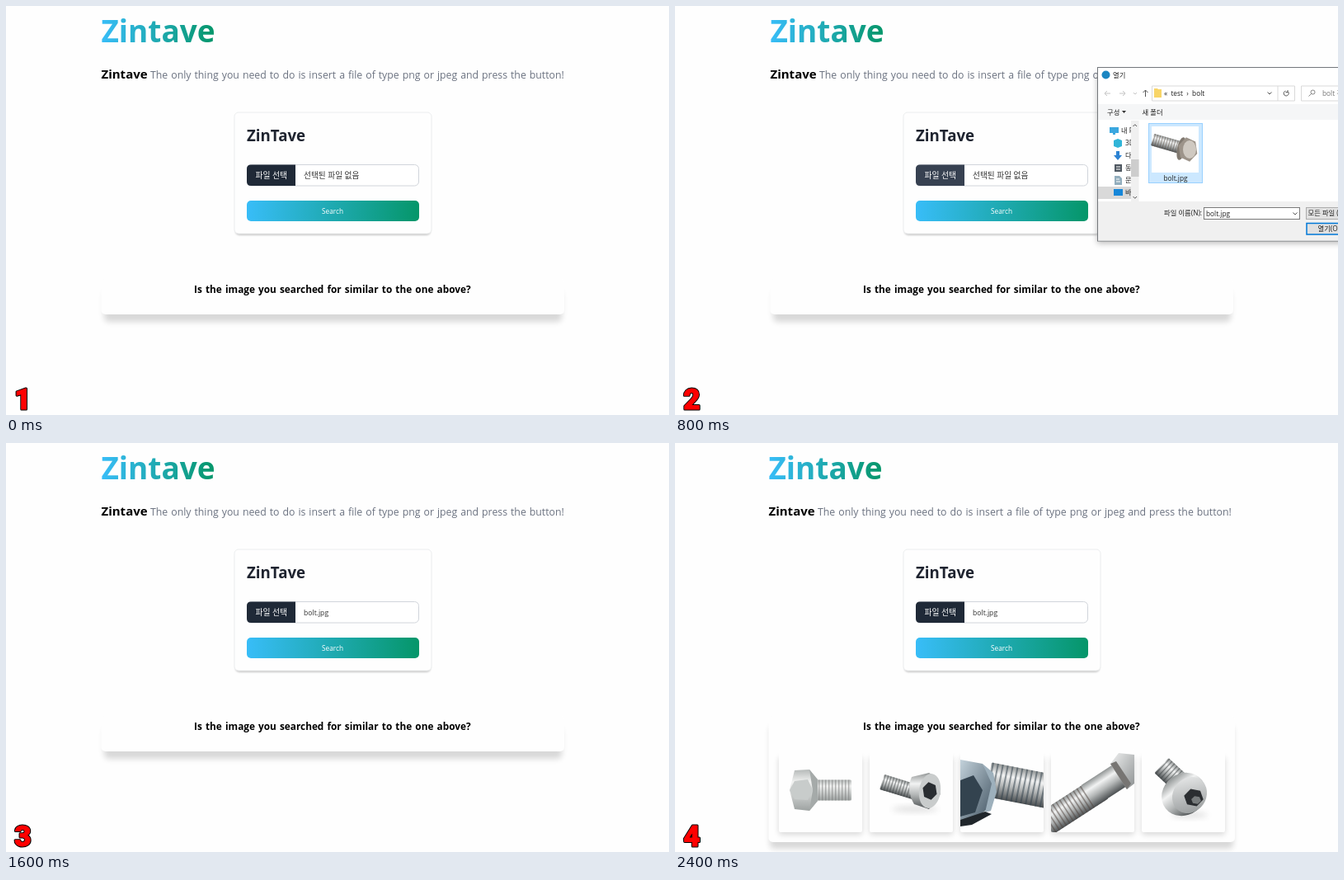
Animation, 804 px wide and 496 px high, one loop 3200 ms. Source, as an HTML page:

```html
<!DOCTYPE html>
<html lang="ko">
<head>
<meta charset="utf-8">
<style>
html, body { margin: 0; width: 100%; height: 100%; overflow: hidden; background: #fefefe; }
svg { display: block; }
text { font-family: "Open Sans", "Noto Sans CJK KR", "Noto Sans CJK", sans-serif; white-space: pre; }
.bold { font-weight: 700; }
.mid { text-anchor: middle; }
.ui { font-size: 8.3px; fill: #222; }
.icon { fill: none; stroke: #555; stroke-width: 1; }
.pale { stroke: #c4c4c4; }
.step { font: 900 35px Roboto, sans-serif; font-stretch: 75%; text-anchor: middle; stroke-linejoin: round; }
</style>
</head>
<body>
<svg width="804" height="496" viewBox="0 0 804 496">
  <defs>
    <linearGradient id="brand"><stop stop-color="#38bdf8"/><stop offset="1" stop-color="#059669"/></linearGradient>
    <linearGradient id="metal" x2="0" y2="1">
      <stop stop-color="#909494"/><stop offset=".3" stop-color="#f2f3f3"/>
      <stop offset=".6" stop-color="#b4b7b7"/><stop offset="1" stop-color="#4c5052"/>
    </linearGradient>
    <linearGradient id="pearl" x2="0" y2="1">
      <stop stop-color="#b5b9b8"/><stop offset=".3" stop-color="#f1f2f1"/><stop offset="1" stop-color="#9da2a1"/>
    </linearGradient>
    <linearGradient id="face" x2="1" y2="1"><stop stop-color="#f0f1f1"/><stop offset="1" stop-color="#8d9192"/></linearGradient>
    <linearGradient id="blue" x2="1" y2="1"><stop stop-color="#c3d2db"/><stop offset="1" stop-color="#415361"/></linearGradient>
    <filter id="soft" x="-10%" y="-40%" width="120%" height="180%"><feGaussianBlur stdDeviation="3.5"/></filter>
    <filter id="thin" x="-10%" y="-10%" width="120%" height="120%"><feGaussianBlur stdDeviation="1.3"/></filter>
    <clipPath id="tile"><rect width="101" height="101" rx="2"/></clipPath>
  </defs>

  <g id="heading">
    <text class="bold" x="115.5" y="43.5" font-size="36.9" fill="url(#brand)">Zintave</text>
    <text class="bold" x="115.5" y="88" font-size="15">Zintave</text>
    <text x="175" y="88" font-size="12.3" word-spacing=".78" fill="#6b7280">The only thing you need to do is insert a file of type png or jpeg and press the button!</text>
  </g>

  <rect x="278" y="132" width="237" height="146" rx="5" opacity=".22" filter="url(#thin)"/>
  <rect x="277" y="129" width="239" height="147" rx="5" fill="#fefefe" stroke="#eceeef"/>
  <text class="bold" x="292" y="164" font-size="18.7" fill="#1f2430">ZinTave</text>
  <rect x="292.5" y="192.5" width="208" height="25.5" rx="5" fill="#fff" stroke="#d1d5db"/>
  <path id="choose" d="M351 192.5H297q-5 0-5 5v15.5q0 5 5 5h54z"/>
  <text x="302.5" y="209" font-size="9.8" fill="#fff">파일 선택</text>
  <text data-on="01" x="361" y="209" font-size="9.7" fill="#333">선택된 파일 없음</text>
  <text data-on="23" x="361" y="209" font-size="8.6" fill="#333">bolt.jpg</text>
  <rect x="292" y="236" width="209" height="25" rx="5" fill="url(#brand)"/>
  <text class="mid" x="396" y="252" font-size="8.3" fill="#fff">Search</text>

  <g data-on="012">
    <rect x="119" y="345" width="555" height="38" rx="5" opacity=".15" filter="url(#soft)"/>
    <rect x="115.5" y="331" width="561.5" height="43" rx="5" fill="#fefefe"/>
  </g>
  <g data-on="3">
    <rect x="115" y="343" width="562" height="149" rx="5" opacity=".15" filter="url(#soft)"/>
    <rect x="113.5" y="331" width="565.5" height="153" rx="5" fill="#fefefe"/>
    <g id="results"></g>
  </g>
  <text class="bold" x="228" y="347.5" font-size="11.8" word-spacing="1.1">Is the image you searched for similar to the one above?</text>

  <g data-on="1">
    <rect x="512" y="80" width="310" height="208" opacity=".25" filter="url(#soft)"/>
    <rect x="512.5" y="74.5" width="310" height="210.5" fill="#fff" stroke="#74787c"/>
    <circle cx="522.5" cy="83.5" r="5" fill="#1b86c2"/>
    <text class="ui" x="531" y="87">열기</text>

    <path class="icon pale" d="M528 106h-7m3-3l-3 3 3 3M539 106h7m-3-3l3 3-3 3M556 105l2 2 2-2"/>
    <path class="icon" d="M570.5 110v-8m-3 3l3-3 3 3"/>
    <path d="M578.5 97h173v18h-173zM731 97v18M810 97h-50.5v18H810" fill="none" stroke="#d9d9d9"/>
    <path d="M581 100h4l1 1h4v10h-9z" fill="#f8d568"/>
    <text class="ui" x="593" y="108.5">«  test  ›  bolt</text>
    <path class="icon" d="M718.5 104.5l2.5 2.5 2.5-2.5M743.5 104a3 3 0 1 1-3-1m2.5-1v2.5h-2.5"/>
    <path class="icon" stroke-opacity=".7" d="M771.5 106.5l-3 3M776 104.5a2.5 2.5 0 1 1-5 0 2.5 2.5 0 0 1 5 0"/>
    <text class="ui" x="785" y="108.5" style="fill:#777">bolt 검색</text>

    <rect x="513" y="119" width="300" height="19" fill="#f5f6f7"/>
    <text class="ui" x="524" y="131.5">구성</text>
    <path d="M542 127h5l-2.5 3z" fill="#333"/>
    <text class="ui" x="566.5" y="131.5">새 폴더</text>

    <rect x="513" y="219" width="40" height="15" fill="#d9d9d9"/>
    <g id="places"></g>
    <rect x="553" y="139" width="9.5" height="98" fill="#f0f0f0"/>
    <rect x="553" y="186" width="9.5" height="21" fill="#cdcdcd"/>
    <path class="icon" d="M555.5 146l2.3-2.3 2.3 2.3M555.5 231l2.3 2.3 2.3-2.3"/>

    <rect x="574.5" y="142.5" width="65" height="72" fill="#cce8ff" stroke="#99d1ff"/>
    <rect x="578" y="146" width="57" height="56" fill="#fff"/>
    <g id="thumb"></g>
    <text class="ui mid" x="607" y="212">bolt.jpg</text>

    <rect x="513" y="237" width="300" height="47.5" fill="#f0f0f0"/>
    <text class="ui" x="593" y="254">파일 이름(N):</text>
    <rect x="641.5" y="244.5" width="116" height="14" fill="#fff" stroke="#7a7a7a"/>
    <text class="ui" x="644" y="254.5">bolt.jpg</text>
    <path class="icon" d="M749.5 250.5l2.5 2.5 2.5-2.5"/>
    <rect x="765.5" y="244.5" width="60" height="14" fill="#e1e1e1" stroke="#adadad"/>
    <text class="ui" x="767.5" y="254">모든 파일 (*.*)</text>
    <rect x="766" y="263.5" width="60" height="13.5" fill="#e1e1e1" stroke="#0078d7" stroke-width="1.5"/>
    <text class="ui" x="779.5" y="273">열기(O)</text>
  </g>

  <text class="step" x="20.5" y="488.5" fill="#000" stroke="#000" stroke-width="3"></text>
  <text class="step" x="20.5" y="488.5" fill="#f00" stroke="#f00" stroke-width="1"></text>
</svg>
<script>
const $ = id => document.getElementById(id);
const all = selector => [...document.querySelectorAll(selector)];

// Threaded rod of given length and thickness, starting at (x, y)
const rod = (x, y, angle, length, thick, pitch, dark = '#3d4243', fill = 'url(#metal)') =>
  `<g transform="translate(${x} ${y}) rotate(${angle})">
    <rect y="${-thick / 2}" width="${length}" height="${thick}" rx="1.5" fill="${fill}"/>
    <path d="M1 0H${length}" stroke="${dark}" stroke-width="${thick}" stroke-dasharray="${pitch * .35} ${pitch * .65}" opacity=".5"/>
  </g>`;

const hex = (x, y, rx, ry, turn, fill) => {
  const points = Array.from({ length: 6 }, (_, i) => {
    const a = (turn + i * 60) * Math.PI / 180;
    return [x + rx * Math.cos(a), y + ry * Math.sin(a)].map(v => v.toFixed(1));
  });
  return `<polygon points="${points.join(' ')}" fill="${fill}"/>`;
};
const oval = (x, y, rx, ry, fill, extra = '') =>
  `<ellipse cx="${x}" cy="${y}" rx="${rx}" ry="${ry}" fill="${fill}" ${extra}/>`;
const shape = (d, fill) => `<path d="${d}" fill="${fill}"/>`;
const shade = (x, y, rx, ry) => oval(x, y, rx, ry, '#444', 'opacity=".14" filter="url(#soft)"');

const photos = [
  rod(43, 50, 0, 45, 25, 4, '#777', 'url(#pearl)') + shape('M19 26L37 25 47 37V63L37 75 19 73 13 50Z', 'url(#pearl)') +
    shape('M19 39L35 37 41 50 35 62 19 61 13 50Z', '#c8cccb') + shape('M37 25L47 37V63L37 75 41 50Z', '#a5aaa9'),

  shade(55, 73, 28, 4) + rod(15, 40, 17, 46, 19, 3.6) +
    shape('M51 34L72 29Q87 36 86 55L72 73 54 67Q44 50 51 34Z', 'url(#metal)') +
    oval(73, 51, 13, 21, '#c9cccc', 'transform="rotate(8 73 51)"') + hex(73, 51, 9, 11, 20, '#292d31'),

  rod(34, 37, 11, 78, 42, 6, '#31404b') +
    shape('M0 13L27 18 40 40 33 73 12 88 0 86Z', 'url(#blue)') + shape('M0 38L16 32 27 50 18 77 0 82Z', '#33434f') +
    shape('M27 18L40 29 44 52 37 75 30 77 38 42Z', '#9db0bc') + shape('M0 86L30 76 38 79 14 92 0 94Z', '#20262b'),

  rod(-8, 92, -33, 82, 31, 5, '#51443f') +
    '<rect y="-15.5" width="45" height="31" fill="url(#metal)" transform="translate(45 57) rotate(-33)"/>' +
    shape('M72 18L82 5 101 7V42L92 49Z', 'url(#face)') + shape('M72 18L79 15 97 42 92 49Z', '#777573'),

  shade(58, 80, 22, 4) + rod(24, 20, 43, 38, 25, 4.2) + oval(51, 55, 28, 25, 'url(#metal)', 'transform="rotate(-38 51 55)"') +
    oval(58, 56, 20, 23, 'url(#face)', 'transform="rotate(35 58 56)"') + hex(63, 59, 12, 11, 12, '#2b2e31') + hex(66, 62, 6, 5, 12, '#777b7c'),
];
$('results').innerHTML = photos.map((photo, i) => `<g transform="translate(${126 + 110 * i} 371)">
  <rect y="10" width="101" height="94" rx="3" opacity=".15" filter="url(#soft)"/>
  <g clip-path="url(#tile)"><rect width="101" height="101" fill="#fefefe"/>${photo}</g></g>`).join('');

$('thumb').innerHTML = rod(579, 162, 16, 37, 15, 3.2, '#62564c') +
  oval(614, 173, 5, 14, '#817970', 'transform="rotate(12 614 173)"') +
  hex(622, 174, 12, 15, 20, '#9d948a') + oval(624, 174, 8, 11, '#cfc9c1');

const places = [['내 PC', '#3ba7df'], ['3D', '#31b5d8'], ['다운', '#2c83d3'], ['동영', '#505962'], ['문서', '#93aebd'], ['바탕', '#1687d9']];
const placeIcons = [
  'M527 147h11v7h-4v2h-3v-2h-4z', 'M537 161l5 2v7l-5 2-5-2v-7z', 'M535 176h4v5h3l-5 6-5-6h3z',
  'M533 192h9v9h-9z', 'M533 206h6l3 3v8h-9z', 'M532 222h11v8h-11z',
];
$('places').innerHTML = places.map(([label, color], i) => shape(placeIcons[i], color) +
  `<text class="ui" x="${i ? 546 : 541}" y="${154 + 15 * i}">${label}</text>`).join('') +
  '<path d="M535 195h5m-5 3h5M535 210h4m-4 3h5" stroke="#fff"/>';

function draw(time) {
  const step = Math.floor(time / 800) % 4;
  for (const el of all('[data-on]')) el.style.display = el.dataset.on.includes(step) ? '' : 'none';
  for (const el of all('.step')) el.textContent = step + 1;
  $('heading').setAttribute('transform', `translate(${step === 3 ? -2 : 0} 0)`);
  $('choose').setAttribute('fill', step === 1 ? '#374151' : '#1f2937');
}
(function tick() {
  draw(performance.now());
  requestAnimationFrame(tick);
})();
</script>
</body>
</html>
```
